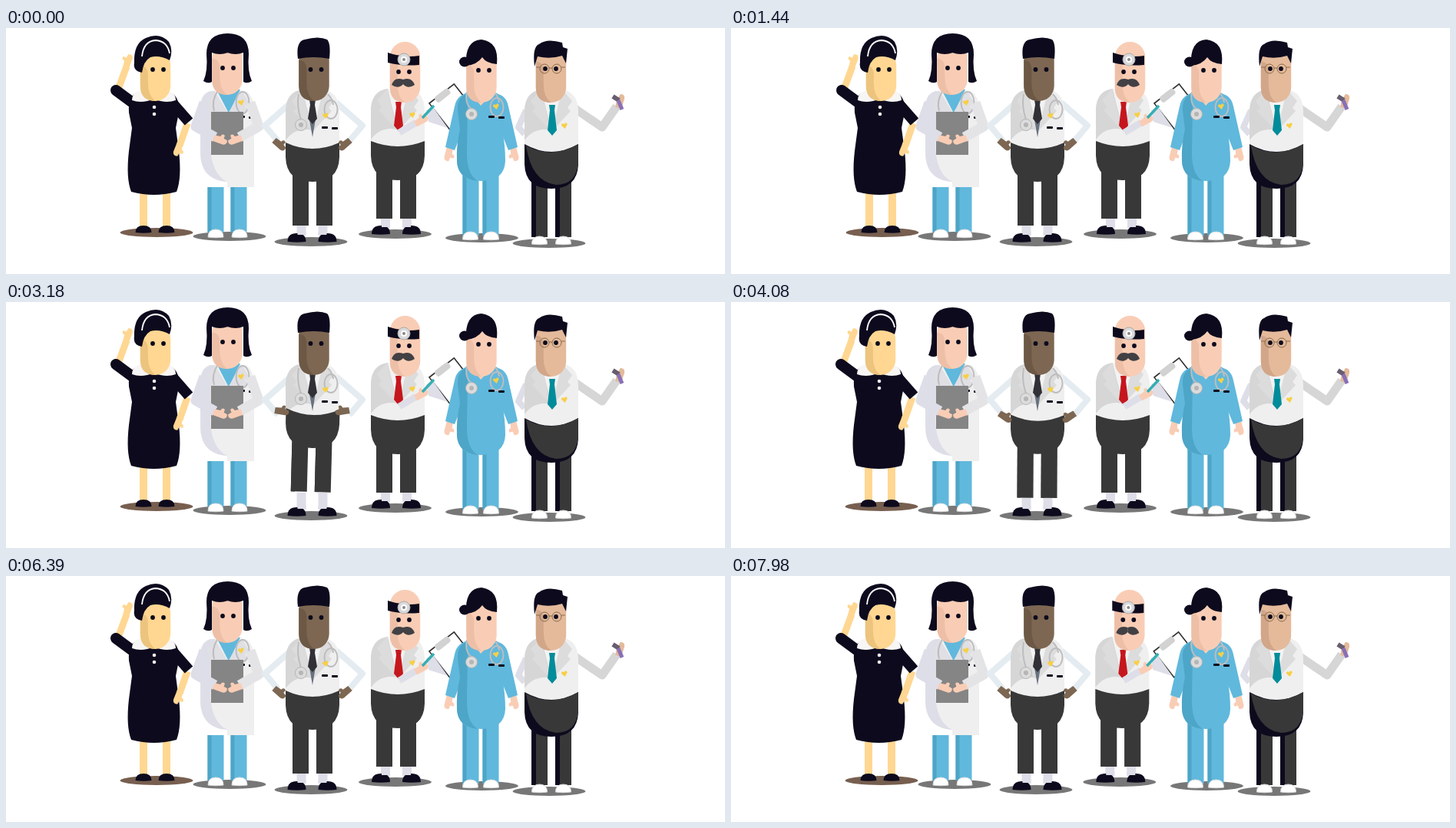
An HTML page that plays this animation: 936x320 px, repeating every 8000 ms.

```html
<!DOCTYPE html>
<html lang="en">
<head>
<meta charset="utf-8">
<title>Medical team</title>
<style>
html, body { margin: 0; width: 100%; height: 100%; overflow: hidden; background: #fff; }
svg { display: block; width: 936px; height: 320px; }
</style>
</head>
<body>
<svg id="stage" viewBox="0 0 936 320"></svg>
<script>
const INK = '#0d0a1d', DARK = '#383838', SKIN = '#f9cdb5', SKIN_SHADE = '#eebfa7';
const YELLOW = '#ffd792', BROWN = '#7d6752', TAN = '#e4ba9b', BLUE = '#60b8dc', BLUE_SHADE = '#4da5c7';
const COAT = '#efefef', COAT_SHADE = '#d6d6d6', PALE = '#dedee8', STEEL = '#bdbdbf';

// Drawing primitives
const path = (d, fill) => `<path d="${d}" fill="${fill}"/>`;
const line = (d, color, width, cap = 'butt') =>
  `<path d="${d}" fill="none" stroke="${color}" stroke-width="${width}" stroke-linecap="${cap}" stroke-linejoin="round"/>`;
const rect = (x, y, w, h, fill, r = 0) =>
  `<rect x="${x}" y="${y}" width="${w}" height="${h}" rx="${r}" fill="${fill}"/>`;
const oval = (x, y, rx, ry, fill, stroke = 'none', width = 1) =>
  `<ellipse cx="${x}" cy="${y}" rx="${rx}" ry="${ry}" fill="${fill}" stroke="${stroke}" stroke-width="${width}"/>`;
const dot = (x, y, r, fill, stroke) => oval(x, y, r, r, fill, stroke);
const group = (id, ...parts) => `<g id="${id}">${parts.join('')}</g>`;
const moved = (transform, shape) => `<g transform="${transform}">${shape}</g>`;
const mirror = (x, shape) => moved(`translate(${2 * x} 0) scale(-1 1)`, shape);
const both = (x, shape) => shape + mirror(x, shape);

// Body parts shared by the figures
const shadow = (x, y, fill = '#777') => oval(x, y, 47.5, 6, fill);
const eyes = (x, y) => both(x, dot(x - 7, y, 2.9, INK));
const handShape = fill => path('M0-4L8-5Q9-10 13-8L13-4 18-3Q20 3 14 4L0 4z', fill);
const hand = (x, y, angle, fill) => moved(`translate(${x} ${y}) rotate(${angle})`, handShape(fill));

function head(x, top, bottom, fill, shade) {
  const r = 19.7, left = x - r, edge = left + 10;
  return rect(left, top, 2 * r, bottom - top, fill, r) +
    path(`M${left} ${top + r}V${bottom - r}Q${left} ${bottom} ${x} ${bottom}Q${edge} ${bottom - 7} ${edge} ${bottom - 24}V${top + 32}Q${edge} ${top + 20} ${left} ${top + r}z`, shade);
}

function shoe(x, y, w, h, fill, outline = 'none') {
  return moved(`translate(${x} ${y})`,
    `<path d="M${-w / 2} 0q0 ${-h} ${w / 2} ${-h}t${w / 2} ${h}q${-w / 2} 1.500 ${-w} 0z" fill="${fill}" stroke="${outline}"/>`);
}

const legs = (x, gap, top, hem, fill, shade = fill, strip = 5) =>
  [x - gap / 2, x + gap / 2].map(c =>
    rect(c - 10.5, top, 21, hem - top, fill) + rect(c - 10.5, top, strip, hem - top, shade)).join('');
const whiteShoes = (x, gap, floor) =>
  both(x, shoe(x - gap / 2, floor, 20, 10, '#fff', '#ddd'));
const darkShoes = (x, floor) => both(x,
  rect(x - 20, floor - 30, 12, 22, PALE) + shoe(x - 20, floor, 24, 11, INK) + rect(x - 19, floor - 13, 11, 4, PALE));

// Round trouser seat whose waistband sags in the middle.
const seat = (x, top, sag, bottom, fill = DARK) =>
  path(`M${x - 35} ${top}Q${x} ${top + 2 * sag} ${x + 35} ${top}V${bottom - 32}Q${x + 34} ${bottom} ${x} ${bottom}T${x - 35} ${bottom - 32}z`, fill);

function jacket(x, top, waist) {
  const shoulder = `M${x - 35} ${top + 30}C${x - 35} ${top + 12} ${x - 28} ${top + 2} ${x - 13} ${top}`;
  const lapel = `M${x - 14} ${top}L${x - 27} ${top + 15} ${x - 21} ${top + 24} ${x - 25} ${top + 28} ${x - 1} ${top + 54}z`;
  return both(x, path(`${shoulder}H${x + 1}V${waist + 15}H${x - 35}z`, COAT)) +
    path(`${shoulder}L${x} ${top + 53}Q${x - 22} ${top + 48} ${x - 35} ${top + 66}z`, COAT_SHADE) +
    both(x, path(lapel, '#dcdcdc')) +
    path(`M${x - 13} ${top}L${x} ${top + 53} ${x + 13} ${top}z`, '#f3f3f3');
}

// Details
const tie = (x, y, h, fill) =>
  path(`M${x - 4} ${y}h8l-1 7 3 ${h - 14}-6 7-6-7 3-${h - 14}z`, fill);
const heart = (x, y) =>
  moved(`translate(${x} ${y}) rotate(-10)`, path('M0 4L-4-1Q-3-5 0-2 3-5 4-1z', '#f8cf45'));
const pens = (x, y) => rect(x, y, 8, 3, INK, 1) + rect(x + 13, y + 1, 8, 3, INK, 1);
const stethoscope = (x, y, bellX, bellY, loopX) =>
  line(`M${x} ${y}Q${x - 3} ${y + 16} ${bellX} ${bellY - 7}`, STEEL, 2) +
  dot(bellX, bellY, 7.5, '#dcdcdc', '#b5b5b5') + dot(bellX, bellY, 3, '#b5b5b5') +
  line(`M${loopX - 4} ${y}Q${loopX + 2} ${y + 6} ${loopX + 3} ${y + 14}`, STEEL, 2) +
  oval(loopX, y + 20, 8.5, 12, 'none', STEEL, 2);

const receptionist = group('receptionist',
  shadow(196, 266, '#775f50'),
  both(194, rect(174, 205, 10, 55, YELLOW) + shoe(179, 266, 21, 9, INK)),
  group('raisedArm',
    line('M147 77L157 50', YELLOW, 9),
    hand(156, 52, -70, YELLOW),
    line('M166 98L143 81', INK, 14, 'round')),
  both(192.5, path('M193 82H176Q158 86 160 110L164 130 160 160Q156 195 163 213 178 217 193 217z', INK)),
  line('M236 124L226 153', YELLOW, 9),
  hand(227, 149, 112, YELLOW),
  line('M217 98L238 122', INK, 14),
  both(192.5, path('M193 81H178Q164 83 164 94 177 99 193 92z', '#f7f6f5')),
  dot(193, 103, 2.3, '#eee'), dot(193, 112, 2.3, '#eee'),
  head(194.5, 29, 95, YELLOW, '#ecc47d'),
  path('M177 58Q165 56 167 45 166 20 182 13 200 5 212 18 218 29 213 42 200 35 188 38 179 43 177 58z', INK),
  line('M177 37Q179 17 195 16 210 17 213 33', '#fff', 1.8),
  eyes(198, 54));

const doctor = group('doctor',
  shadow(291, 271),
  legs(288, 30, 207, 266, BLUE, BLUE_SHADE),
  whiteShoes(288.5, 31, 272),
  path('M266 82H312Q323 88 323 109V207H288V200Q253 198 253 161V104Q253 86 266 82z', COAT),
  path('M266 82Q253 86 253 104V161Q253 198 288 200 267 190 266 153L272 82z', PALE),
  path('M274 80L290 111 305 80z', BLUE),
  both(289, path('M271 81L261 98 267 102 263 106 284 138 289 111z', '#dfdfe4')),
  line('M276 81Q267 95 271 108', STEEL, 2),
  oval(308, 97, 8.5, 14, 'none', STEEL, 2),
  heart(306, 97), pens(303, 114),
  rect(267, 109, 42, 56, '#858585'),
  line('M258 97L247 128 272 142', PALE, 13),
  mirror(288, line('M258 97L247 128 272 142', '#e4e4e6', 13)),
  both(288.5, hand(270, 143, 20, SKIN)),
  head(288, 20, 87, SKIN, SKIN_SHADE),
  both(288.5, path('M289 7Q261 7 261 34 263 56 257 69 263 73 268 70V32Q278 36 289 32z', INK)),
  eyes(289, 52));

const surgeonArm = line('M371 97L337 127 354 147', '#e4ecf1', 8);
const surgeon = group('surgeon',
  shadow(397, 278),
  darkShoes(398.5, 278),
  both(400.5, surgeonArm),
  jacket(399, 80, 150),
  path('M395 119L399 142 403 119z', '#68717e'),
  tie(399, 93, 32, '#303036'),
  stethoscope(381, 86, 384, 126, 423),
  heart(416, 114), pens(411, 128),
  group('trousers', seat(399, 149, 8, 200), legs(399, 31, 184, 257, DARK)),
  group('leftHand', handShape(BROWN)),
  mirror(398.5, group('rightHand', handShape(BROWN))),
  head(401, 22, 95, BROWN, '#6c5845'),
  path('M380 40Q377 17 389 15 407 10 418 15 423 20 421 40 400 36 380 40z', INK),
  eyes(403.5, 54));

const clipboard = moved('translate(551 98) rotate(-38)',
  '<path d="M0 0H41V43H0z" fill="#fff" stroke="#303030" stroke-width="1.6"/>' + rect(9, -2, 22, 9, '#d2d2d2', 3));

const specialist = group('specialist',
  shadow(506.5, 268),
  darkShoes(508, 268),
  clipboard,
  path('M547 107L556 103 575 130 550 122z', PALE),
  jacket(510, 79, 147),
  seat(510, 147, 7, 198), legs(508, 31, 184, 248, DARK),
  tie(511, 96, 38, '#c5161d'),
  heart(529, 113),
  line('M512 136L534 123', PALE, 9),
  hand(533, 125, -28, SKIN),
  line('M542 117L557 101', '#35aeb3', 3.5),
  head(519.5, 18, 97, SKIN, SKIN_SHADE),
  path('M497 32Q517 39 538 36V48Q516 50 497 45z', INK),
  dot(518, 41, 8, '#d9d9db', '#aaa'), dot(518, 41, 4, '#fff'), dot(518, 41, 2, '#888'),
  eyes(518, 57),
  both(517, path('M517 67Q506 63 502 74 511 80 517 73z', '#414044')));

const nurse = group('nurse',
  shadow(619.5, 273),
  legs(618, 26, 180, 270, BLUE, BLUE_SHADE),
  whiteShoes(618, 27, 275),
  both(619, hand(578, 155, 105, SKIN) + path('M603 85Q587 86 584 102L572 155 584 159 600 119z', BLUE)),
  both(618.5, path('M619 83H602Q587 88 588 107L591 132Q587 153 587 173 588 199 619 199z', BLUE)),
  path('M598 86Q587 92 588 107L591 132Q586 153 587 173 588 196 614 199 599 190 600 159L601 99z', BLUE_SHADE),
  path('M605 84L618 101 634 84z', SKIN),
  stethoscope(600, 83, 606, 112, 639),
  heart(638, 102), pens(628, 114),
  head(619, 28, 97, SKIN, SKIN_SHADE),
  oval(597, 44, 7, 6.5, INK),
  path('M599 49Q597 16 619 15 642 18 639 47 625 46 620 38 613 48 599 49z', INK),
  group('nurseEyes', eyes(622, 55)));

const examiner = group('examiner',
  shadow(707, 280),
  legs(710, 31, 195, 272, DARK, INK, 6),
  whiteShoes(710, 31, 281),
  line('M677 107L667 129 675 138', PALE, 8),
  line('M738 103L776 129 795 102', COAT_SHADE, 11),
  hand(797, 104, -72, TAN),
  line('M790 89L798 94', '#685d70', 6),
  line('M797 94L802 106', '#8870b7', 5),
  jacket(710, 80, 151),
  seat(710, 151, 10, 209, INK),
  path('M677 153Q710 171 745 151V176Q742 204 716 204 684 200 677 153z', DARK),
  tie(711, 100, 40, '#008c9a'),
  heart(727, 127),
  head(709.5, 24, 97, TAN, '#d2a688'),
  path('M688 50Q685 24 694 21 704 13 724 19L725 25 731 27 729 46 724 36Q708 41 692 37z', INK),
  eyes(709, 53),
  both(709, dot(701, 53, 6, 'none', '#876b4b') + line('M690 51H695M707 52H709', '#876b4b', 1)));

document.getElementById('stage').innerHTML =
  receptionist + doctor + surgeon + specialist + examiner + nurse;

// Motion
const LOOP = 8000;
const part = id => document.getElementById(id);
const place = (id, transform) => part(id).setAttribute('transform', transform);
const ramp = (t, from, to) => {
  const p = Math.min(1, Math.max(0, (t - from) / (to - from)));
  return p * p * (3 - 2 * p);
};
const pulse = (t, from, to) =>
  t > from && t < to ? Math.sin(Math.PI * (t - from) / (to - from)) ** 2 : 0;

function pose(t) {
  const wave = pulse(t, 60, 780) + pulse(t, 1680, 2400);
  place('raisedArm', `rotate(${-24 * wave} 164 97)`);
  place('receptionist', `translate(${pulse(t, 1100, 1780)} 0)`);

  // Hitch the trousers up, then let them slide down.
  const hitch = ramp(t, 2500, 3050) * (1 - ramp(t, 3250, 4450));
  place('trousers', `translate(0 ${-10 * hitch}) rotate(${1.5 * hitch} 399 170)`);
  const grip = `translate(${349 + hitch} ${146 - 5 * hitch}) rotate(${42 - 32 * hitch})`;
  place('leftHand', grip);
  place('rightHand', grip);

  place('specialist', `translate(${-0.7 * ramp(t, 7850, 7980)} 0)`);
  part('nurseEyes').setAttribute('visibility', t >= 5370 && t < 5520 ? 'hidden' : 'visible');
}

const start = performance.now();
function tick() {
  pose((performance.now() - start) % LOOP);
  requestAnimationFrame(tick);
}
tick();
</script>
</body>
</html>
```
